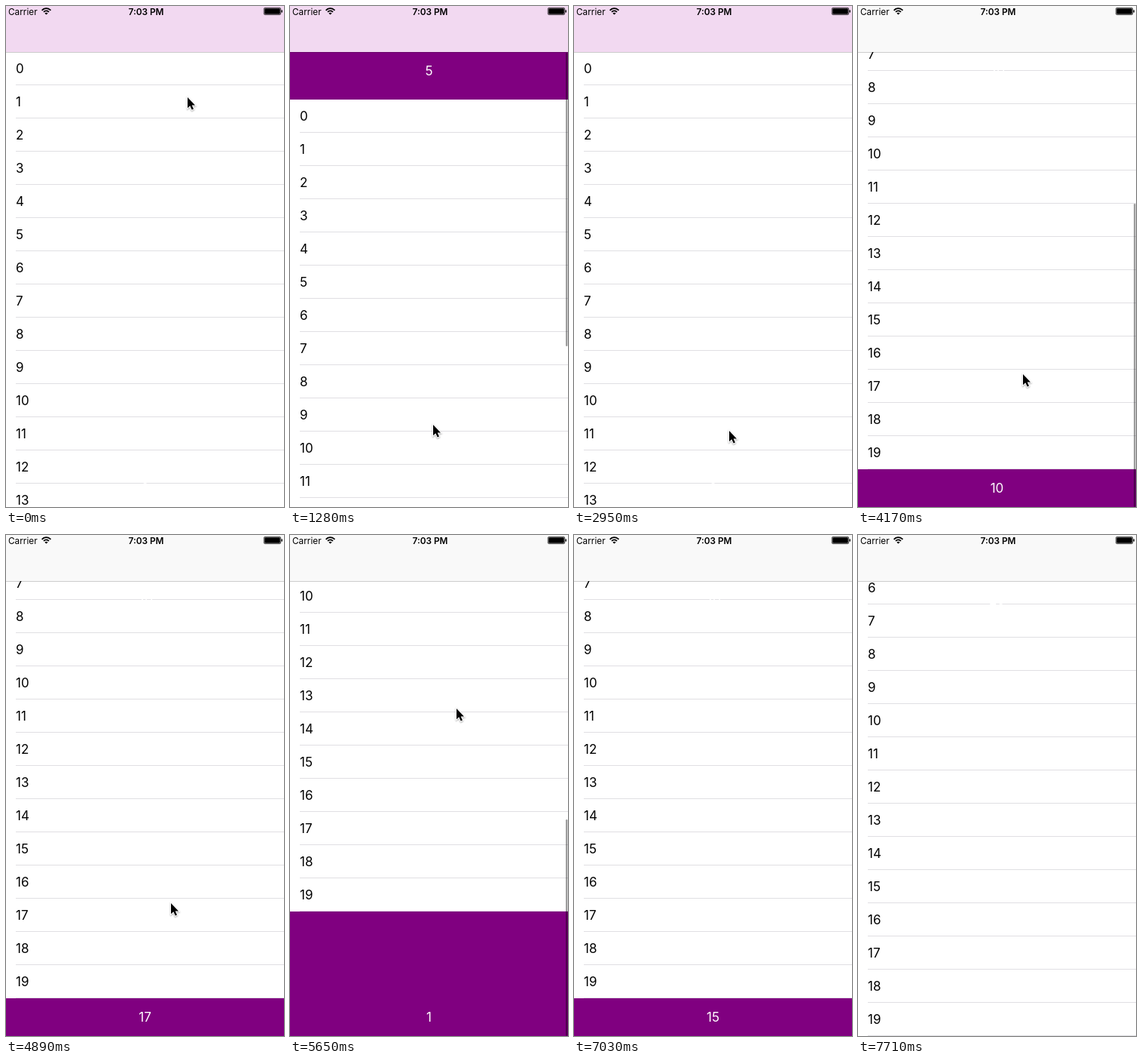
These frames come from a looping animation (369 by 664 pixels, 8170 ms). An HTML page with a canvas:

```html
<!DOCTYPE html>
<html lang="en">
<head>
<meta charset="utf-8">
<title>Pull to refresh</title>
<style>
html, body { margin: 0; width: 100%; height: 100%; overflow: hidden; background: #fff; }
canvas { display: block; }
</style>
</head>
<body>
<canvas id="stage" width="369" height="664"></canvas>
<script>
const ctx = document.getElementById('stage').getContext('2d');
const W = 369, H = 664, LOOP = 8170;
const NAV = 61, ROW = 44, ROWS = 20, VIEW = H - NAV;
const END = ROWS * ROW - VIEW, INSET = 50;
const PURPLE = '#800080';
const FONT = 'Inter, Roboto, sans-serif';

const clamp = (v, a = 0, b = 1) => Math.min(b, Math.max(a, v));
const smooth = u => u * u * (3 - 2 * u);
const progress = (t, start, length) => smooth(clamp((t - start) / length));
const rubber = d => VIEW * (1 - 1 / (d * 0.55 / VIEW + 1));
const RATE = 0.0104; // spring stiffness per ms
const spring = ms => (1 + RATE * ms) * Math.exp(-RATE * ms);

// Pointer path: time, x, y
const path = [
  [60, 241, 121], [170, 213, 126], [330, 213, 126], [880, 190, 555],
  [1300, 190, 555], [2000, 206, 563], [2960, 206, 563], [3190, 212, 270],
  [3400, 213, 270], [4150, 219, 488], [5000, 219, 488], [5600, 221, 230],
  [5680, 221, 230], [6310, 361, 538], [6420, 400, 560]
];

function pointer(t) {
  const i = path.findIndex(p => p[0] > t);
  if (i < 0) return path[path.length - 1].slice(1);
  if (i === 0) return path[0].slice(1);
  const [t0, x0, y0] = path[i - 1], [t1, x1, y1] = path[i];
  const u = progress(t, t0, t1 - t0);
  return [x0 + (x1 - x0) * u, y0 + (y1 - y0) * u];
}

function scroll(t, y) {
  const rest = END + INSET;
  if (t < 330) return 0;
  if (t < 915) return -rubber(y - 126);
  if (t < 2960) return -(INSET + 120 * spring(t - 915)) * (1 - progress(t, 2690, 250));
  if (t < 3130) return 563 - y;
  if (t < 5000) { // flick settling above the bottom inset
    const ms = t - 3130;
    return rest + (0.607 * ms - 83) * Math.exp(-RATE * ms);
  }
  if (t < 5645) return rest + rubber(488 - y);
  return rest + 115 * spring(t - 5645) - INSET * progress(t, 7460, 250);
}

const count = (t, start) => clamp(Math.floor((t - start) / 100), 0, 20);

function rect(color, x, y, w, h) {
  ctx.fillStyle = color;
  ctx.fillRect(x, y, w, h);
}

function pill(color, x, y, w, h, r) {
  ctx.fillStyle = color;
  ctx.beginPath();
  ctx.roundRect(x, y, w, h, r);
  ctx.fill();
}

function text(str, x, y, { color = '#000', size = 17, weight = 400, align = 'left' } = {}) {
  ctx.font = `${weight} ${size}px ${FONT}`;
  ctx.textAlign = align;
  ctx.fillStyle = color;
  ctx.fillText(str, x, y);
}

function drawList(s, t) {
  const top = NAV - s, bottom = top + ROWS * ROW;
  if (top > NAV) rect(PURPLE, 0, NAV, W, top - NAV);
  for (let i = 0; i < ROWS; i++) {
    const y = top + i * ROW;
    text(i, 13, y + 28);
    rect('#e0dfe3', 13, y + ROW - 1, W - 13, 1);
  }
  if (bottom < H) rect(PURPLE, 0, bottom, W, H - bottom);
  const label = { color: '#fff', align: 'center' };
  text(count(t, 700), 184.5, NAV + 31, label);
  text(count(t, t < 5475 ? 3160 : 5475), 184.5, H - 19, label);
}

function drawIndicator(s, t) {
  const shown = (from, to) => clamp((t - from) / 60) * clamp((to - t) / 250);
  const alpha = Math.max(shown(340, 1900), shown(2980, 4650), shown(5000, 6800));
  if (!alpha) return;
  const length = 402 - Math.max(0, -INSET - s, s - END - INSET);
  const y = s > END ? H - length : 62 + clamp(s / END) * 200;
  pill(`rgba(0,0,0,${0.38 * alpha})`, 366, y, 2.5, length, 1.2);
}

function drawNav(s) {
  rect('#f9f9f9', 0, 0, W, NAV);
  const edge = NAV - Math.max(0, s);
  if (edge > -20) {
    const fade = ctx.createLinearGradient(0, edge, 0, edge + 20);
    fade.addColorStop(0, '#f2d9f1');
    fade.addColorStop(1, '#f2d9f100');
    rect(fade, 0, 0, W, NAV);
  }
  rect('rgba(0,0,0,.2)', 0, NAV, W, 1);

  text('Carrier', 3, 11.5, { size: 11.8 });
  text('7:03 PM', 186, 11.5, { size: 11.8, weight: 600, align: 'center' });

  ctx.strokeStyle = '#000';
  ctx.lineWidth = 1.7;
  for (const r of [4.6, 7.8]) {
    ctx.beginPath();
    ctx.arc(53.5, 11, r, -Math.PI * 0.77, -Math.PI * 0.23);
    ctx.stroke();
  }
  ctx.fillStyle = '#000';
  ctx.beginPath();
  ctx.moveTo(53.5, 11.6);
  ctx.arc(53.5, 11.6, 2.8, -Math.PI * 0.77, -Math.PI * 0.23);
  ctx.fill();

  ctx.lineWidth = 0.7;
  ctx.beginPath();
  ctx.roundRect(342.3, 2.4, 22.4, 9.2, 1.6);
  ctx.stroke();
  pill('#000', 343.2, 3.2, 20.6, 7.6, 0.8);
  pill('#000', 365.4, 5.2, 1.5, 3.6, 0.7);
}

const arrow = new Path2D('M0 0V14.2L3.3 11.2L5.7 16.6L8 15.6L5.7 10.4H10Z');

function drawPointer(x, y) {
  ctx.save();
  ctx.translate(x, y);
  ctx.shadowColor = 'rgba(0,0,0,.35)';
  ctx.shadowBlur = 2;
  ctx.shadowOffsetY = 1;
  ctx.strokeStyle = '#fff';
  ctx.lineWidth = 2;
  ctx.stroke(arrow);
  ctx.shadowColor = 'transparent';
  ctx.fillStyle = '#000';
  ctx.fill(arrow);
  ctx.restore();
}

function draw(t) {
  const [x, y] = pointer(t);
  const s = Math.round(scroll(t, y));
  rect('#fff', 0, 0, W, H);
  drawList(s, t);
  drawIndicator(s, t);
  drawNav(s);
  drawPointer(x, y);
}

const start = performance.now();
function tick() {
  draw((performance.now() - start) % LOOP);
  requestAnimationFrame(tick);
}
tick();
</script>
</body>
</html>
```
